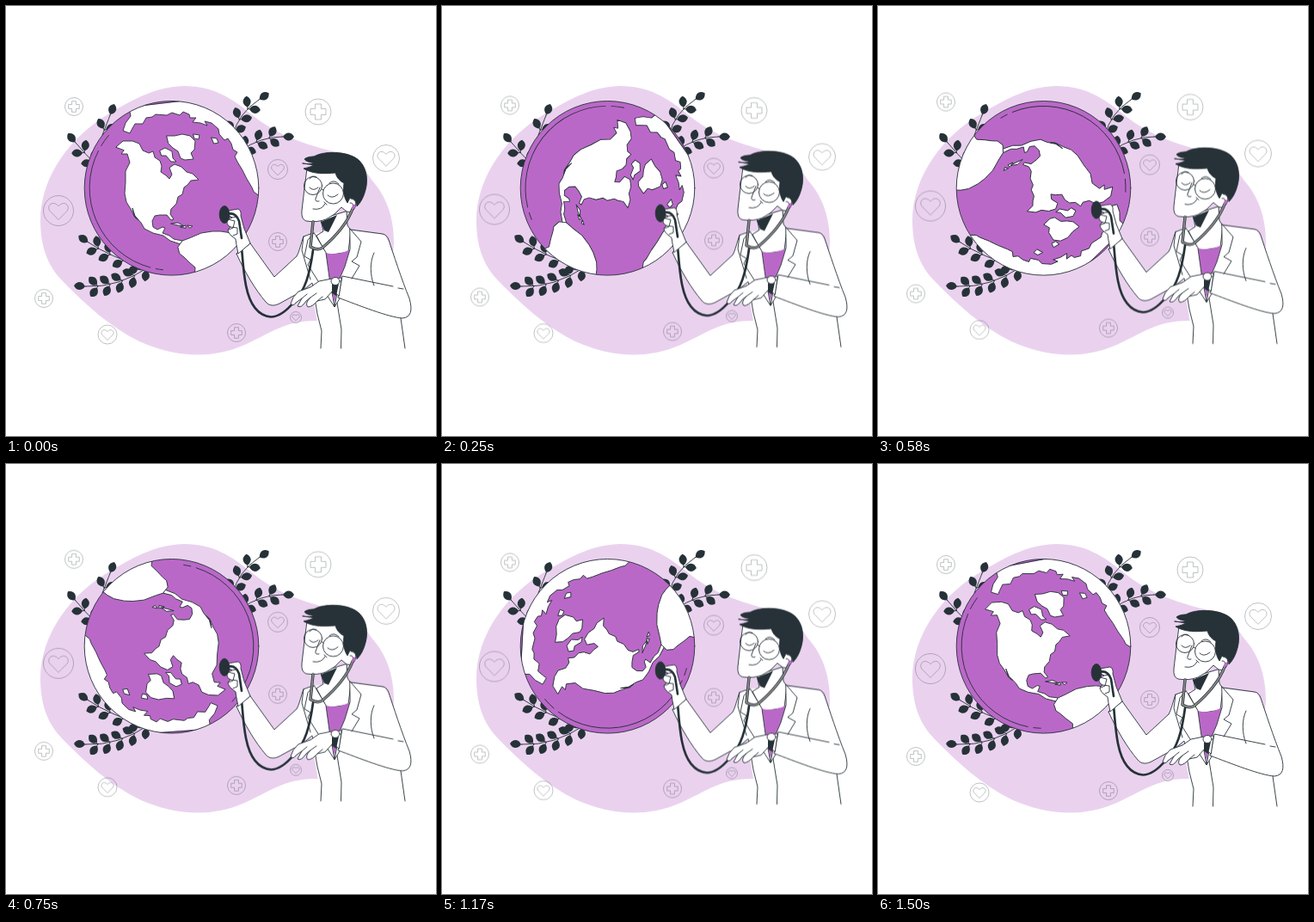
These frames come from a looping animation (500 by 500 pixels, 1.54 s). An HTML page:

```html
<!DOCTYPE html>
<html lang="en">
<head>
<meta charset="utf-8">
<title>Planet check-up</title>
<style>
  html, body { margin: 0; width: 100%; height: 100%; overflow: hidden; background: #fff; }
  svg { display: block; width: 100vw; height: 100vh; }
  .line { fill: none; stroke: #263238; stroke-width: .9; stroke-linecap: round; stroke-linejoin: round; }
  .white { fill: #fff; }
  .dark { fill: #263238; }
  .purple { fill: #ba68c8; }
  .flat { stroke: none; }
  #icons { fill: none; stroke: #263238; stroke-width: .7; opacity: .42; }
</style>
</head>
<body>
<svg viewBox="0 0 500 500">
  <clipPath id="disc"><circle cx="192.5" cy="211.8" r="101.3"/></clipPath>

  <path fill="#ead2ef" d="M40 250C40 198 75 151 122 124C150 107 178 93 208 93C240 93 262 107 283 124C308 145 335 158 384 170C405 178 417 188 425 202C445 224 451 250 451 275C450 320 415 367 360 366C322 366 304 383 275 395C235 412 193 407 155 390C122 374 92 347 64 318C47 300 40 277 40 250Z"/>
  <g id="plants"></g>

  <circle class="purple" cx="192.5" cy="211.8" r="101.3"/>
  <g clip-path="url(#disc)">
    <g id="land" class="line">
      <g class="white">
        <path d="M143 118L145 128L139 136L136 145L144 148L146 144L150 137L159 137L163 130L170 129L174 126L187 127L193 124L202 127L206 123L213 126L214 130L221 130L217 135L226 136L234 139L231 134L239 136L247 143L248 149L254 156L258 154L262 160L264 167L269 170L266 175L269 181L275 191L280 201L286 211L288 216L296 222V100Z"/>
        <path d="M128 164L136 157L147 157L155 160L159 168L166 171L171 169L173 176L179 180L181 186L180 193L186 197L190 201L193 196L190 188L196 184L204 187L210 193L217 195L224 202L215 203L211 208L207 211L205 219L200 222L198 230L192 236L191 242L195 248L192 249L187 243L179 243L173 244L170 250L171 257L176 260L182 257L185 258L182 264L190 267L195 271L205 273L203 277L191 273L183 267L171 264L161 259L157 252L150 244L147 235L149 244L154 249L150 246L145 236L140 228L138 218L139 205L139 192L144 182L141 172L134 172L137 168Z"/>
        <path d="M200 280L205 273L213 270L227 264L240 262L250 262L262 264L270 268L282 277L250 320H219L220 304L213 298L207 292L202 288Z"/>
        <path d="M187 151L196 151L205 149L214 151L220 157L219 167L215 171L218 178L208 179L203 177L200 169L194 165L189 160Z"/>
        <path d="M179 168L185 165L193 169L194 177L198 181L192 181L186 174L181 174Z"/>
        <path d="M218 149L225 150L224 155L219 154ZM239 153L245 154L247 159L242 160Z"/>
        <path d="M192 253L200 252L207 256L200 255ZM203 257L209 255L209 258ZM211 255L217 256L214 258Z"/>
      </g>
      <path id="shine"/>
    </g>
  </g>
  <circle class="line" cx="192.5" cy="211.8" r="101.3"/>

  <g id="floating">
    <g id="icons"></g>

    <g class="line">
      <!-- coat and raised arm -->
      <path class="white flat" d="M357 264L400 261L440 266L446 276L464 398H367L354 320L345 290Z"/>
      <path class="white" d="M357 264L346 268C343 276 341 286 338 291L312 315L284 276L268 288C278 310 290 330 302 344C306 349 312 349 318 346L345 331L356 322L362 358L367 378L366 398"/>
      <path d="M346 268L344 284L354 318M459 363L464 398M385 345L390 376L389.500 398M268 288L284 276"/>

      <!-- neck, shirt and lapels -->
      <path class="white" d="M366 248L369 262L361 267L373 290L398 286L401 261L397 255L396 239Z"/>
      <path class="purple flat" d="M372 287Q386 291 400 283L394 303L388 317L382 346L376 316Z"/>
      <path class="white" d="M358 264L351 272L347 291L354 295L351 301L382 350L376 316L372 287Z"/>
      <path class="white" d="M400 259L413 274L408 292L402 297L411 302L382 350L388 317L394 303L400 283Z"/>

      <!-- folded forearm -->
      <path class="white flat" d="M391 315L428 323L444 271L471 350Q473 361 462 363Q450 362 386 339Z"/>
      <path d="M401 260L438 265Q443 266 445 272C450 287 460 318 469 340C473 354 471 362 461 363C445 362 410 348 386 339L391 314L450 326M456 328L462 329"/>
      <path d="M428 287C423 297 423 313 428 325"/>

      <!-- head -->
      <path class="dark flat" d="M366 251L385 243L375 263L370 261Z"/>
      <path class="white" d="M350 189L347 212L344 238Q343 248 349 250Q362 252 372 248Q383 243 390 234L396 239Q403 241 406 234Q409 225 401 224L394 190Z"/>
      <path class="dark" d="M345 183C350 184 355 184 358 182C352 182 348 180 347 178C352 174 358 176 360 174C373 168 400 169 411 180C420 189 421 203 418 214Q415 226 408 233Q408 224 400 223L397 229Q391 220 393 206Q385 202 383 194C372 195 357 196 346 189Q356 187 357 185Z"/>
      <path d="M353 201Q356 196 361 199M376 206Q381 201 387 207M353 211Q357 216 363 211M374 220Q379 225 386 219M365 211L360 224Q359 228 364 227M357 236Q367 238 371 230M370 228L373 231M392 215L401 222M400 229Q405 228 403 236M367 213L369 214"/>
      <circle cx="357" cy="209" r="10.500"/>
      <circle cx="380.500" cy="218" r="12"/>

      <!-- stethoscope -->
      <path stroke-width="2.7" d="M357 284C353 313 348 330 335 344C325 356 316 361.500 308 361.500C292 360 283 345 279 325C274 300 275 272 270 254Q266 241 258 241"/>
      <path stroke-width="3.4" d="M403 236C396 254 381 270 368 281Q363 285 354 280L357 251"/>
      <path stroke="#8a8a8a" stroke-width="1.9" d="M403 236C396 254 381 270 368 281Q363 285 354 280L357 251"/>
      <path stroke="#ba68c8" stroke-width="3" d="M403 235L405 232"/>

      <!-- hand on the globe -->
      <path class="white" d="M258 238L270 236Q274 238 273 244L277 259L284 276L270 288L268 278L267 271Q258 265 258 260L261 257Q255 254 258 248L263 246L258 243Z"/>
      <path d="M258 248L266 250L264 258L259 260M261 257L269 258L269 265L264 267M263 246L268 245"/>
      <ellipse class="dark" cx="254" cy="242.500" rx="5.800" ry="10"/>
      <path stroke-width="2.6" d="M257 242Q267 239 271 250L274 270"/>

      <!-- resting hand and watch -->
      <path class="white" d="M390 316L379 317L364 320L354 327L340 332Q333 338 331 346Q334 350 337 345L344 340L339 349Q343 352 349 343L354 339Q347 346 351 350Q356 350 362 343L371 341L380 331L387 337Z"/>
      <path d="M344 340L350 335M354 339L361 334M362 343L368 338"/>
      <path class="dark flat" d="M379 321L387 323L384 337L379 334Z"/>
      <ellipse class="white" cx="383" cy="320" rx="5" ry="4.500"/>
    </g>
  </g>
</svg>

<script>
const FRAME = 1000 / 24, LOOP = 1540, STEPS = 36;
const CX = 192.5, CY = 211.8;
const $ = id => document.getElementById(id);

// A curved stem with a leaf at its tip and leaves in pairs below it.
function plant([x0, y0, cx, cy, x1, y1, pairs]) {
  const leaf = (x, y, deg, stalk) =>
    `<g transform="translate(${x} ${y}) rotate(${deg})"><path class="line" d="M0 0H${stalk}"/>` +
    `<path class="dark" transform="translate(${stalk})" d="M0 0C3 -5 9 -7 13 0C9 7 3 5 0 0"/></g>`;
  const mix = (a, b, c, t) => (1 - t) ** 2 * a + 2 * t * (1 - t) * b + t * t * c;
  const slope = (a, b, c, t) => (1 - t) * (b - a) + t * (c - b);
  let out = `<path class="line" d="M${x0} ${y0}Q${cx} ${cy} ${x1} ${y1}"/>`;
  for (let i = 0; i <= pairs; i++) {
    const t = (i + .25) / (pairs + .25), last = i === pairs;
    const x = mix(x0, cx, x1, t), y = mix(y0, cy, y1, t);
    const deg = Math.atan2(slope(y0, cy, y1, t), slope(x0, cx, x1, t)) * 180 / Math.PI;
    out += last ? leaf(x, y, deg, 1) : leaf(x, y, deg - 50, 2) + leaf(x, y, deg + 50, 2);
  }
  return out;
}

$('plants').innerHTML = [
  [264, 150, 270, 125, 294, 109, 3],
  [273, 168, 296, 152, 321, 152, 3],
  [112, 150, 118, 135, 121, 127, 1],
  [105, 185, 92, 172, 81, 159, 2],
  [160, 304, 118, 290, 96, 275, 4],
  [167, 303, 130, 328, 93, 326, 5]
].map(plant).join('');

const CROSS = 'M-.23 -.6H.23V-.23H.6V.23H.23V.6H-.23V.23H-.6V-.23H-.23Z';
const HEART = 'M0 .6L-.57 .02C-.82 -.3 -.4 -.75 0 -.3C.4 -.75 .82 -.3 .57 .02Z';
$('icons').innerHTML = [
  [79, 117, 10.5, CROSS], [44, 340, 10.5, CROSS], [268, 380, 10.5, CROSS],
  [316, 274, 10.5, CROSS], [363, 123, 15, CROSS],
  [61, 238, 17.5, HEART], [118, 382, 11, HEART], [316, 190, 11.5, HEART],
  [442, 177, 15.5, HEART], [337, 362, 6.5, HEART]
].map(([x, y, r, shape]) =>
  `<g transform="translate(${x} ${y})"><circle r="${r}"/>` +
  `<path transform="scale(${r})" stroke-width="${.7 / r}" d="${shape}"/></g>`).join('');

const rim = deg => {
  const a = deg * Math.PI / 180;
  return `${CX + 95.5 * Math.cos(a)} ${CY + 95.5 * Math.sin(a)}`;
};
$('shine').setAttribute('d', [[96, 101], [105, 207], [211, 220]]
  .map(([from, to]) => `M${rim(from)}A95.5 95.5 0 0 1 ${rim(to)}`).join(''));

function draw() {
  const step = Math.floor((performance.now() % LOOP + 5) / FRAME);
  const p = step / STEPS;
  const turn = 356 * p + 4.5 * Math.sin(Math.PI * p);
  const lift = -3.1 * (1 - Math.cos(2 * Math.PI * p));
  $('land').setAttribute('transform', `rotate(${turn} ${CX} ${CY})`);
  $('floating').setAttribute('transform', `translate(0 ${lift})`);
  requestAnimationFrame(draw);
}
draw();
</script>
</body>
</html>
```
